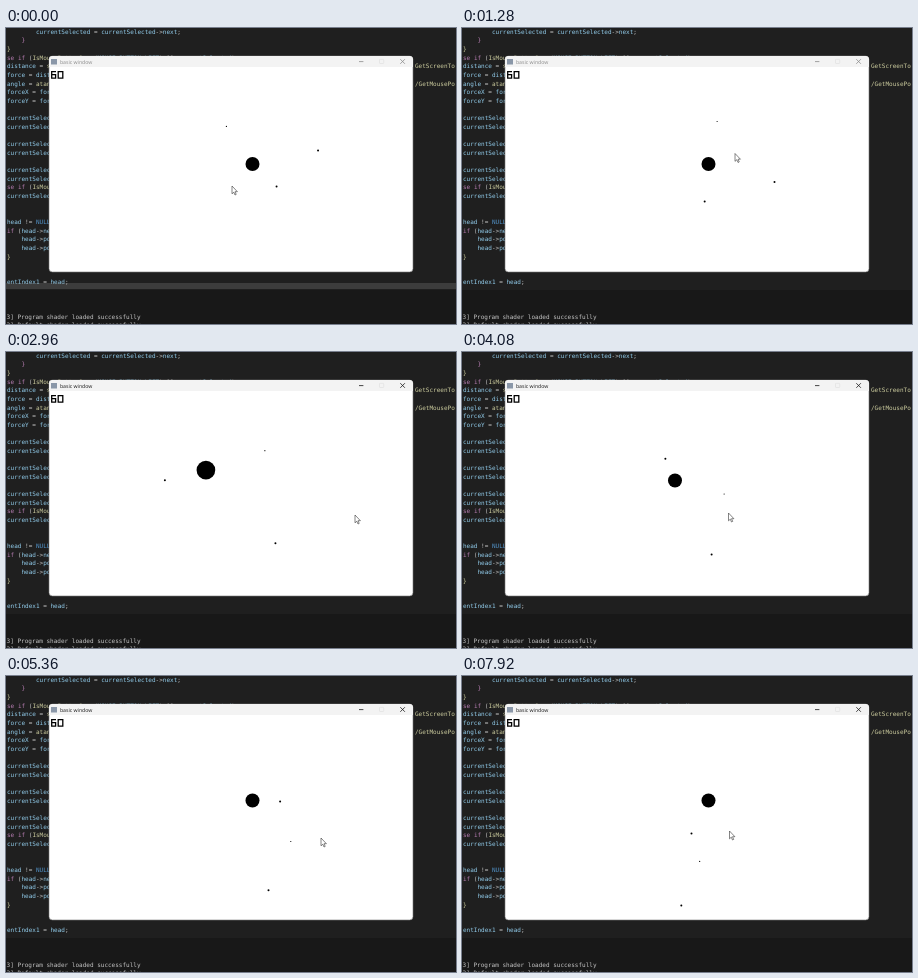
An HTML page for the animation above (8000 ms loop, 450 px wide and 296 px high).

```html
<!DOCTYPE html>
<html lang="en">
<head>
<meta charset="utf-8">
<title>basic window</title>
<style>
  html, body { margin: 0; width: 100%; height: 100%; overflow: hidden; background: #1f1f1f; }
  svg { display: block; width: 450px; height: 296px; }
  text { white-space: pre; text-rendering: geometricPrecision; }
  .mono { font: 6.03px "DejaVu Sans Mono", "Liberation Mono", monospace; fill: #d4d4d4; opacity: .92; }
  .flow { fill: #c586c0; }
  .const { fill: #569cd6; }
  .call { fill: #dcdcaa; }
  .name { fill: #9cdcfe; }
  #title { font: 5.2px "Open Sans", "Noto Sans", sans-serif; }
</style>
</head>
<body>
<svg viewBox="0 0 450 296">
  <rect width="450" height="296" fill="#1f1f1f"/>
  <g id="code" class="mono"></g>
  <rect id="scroll" y="255" width="450" height="6" fill="#797979"/>
  <rect y="262" width="450" height="34" fill="#181818"/>
  <g class="mono">
    <text x=".6" y="291">3] Program shader loaded successfully</text>
    <text x=".6" y="299">3] Default shader loaded successfully</text>
  </g>
  <rect x="43" y="28" width="364" height="216" rx="3.5" fill="#fff" stroke="#777" stroke-width=".6"/>
  <path d="M43 39V31.5a3.5 3.5 0 0 1 3.5-3.5h357a3.5 3.5 0 0 1 3.5 3.5V39z" fill="#f3f3f3"/>
  <rect x="45" y="31" width="6" height="5.5" fill="#8a97a8"/>
  <g id="chrome">
    <text id="title" x="53.9" y="35.8" fill="currentColor">basic window</text>
    <path d="M353 33.6h4.4M394.3 31.2l4.6 4.6m0-4.6l-4.6 4.6" stroke="currentColor" stroke-width=".8" fill="none"/>
  </g>
  <rect x="373.5" y="31.3" width="4.2" height="4.2" rx=".6" fill="none" stroke="#ddd" stroke-width=".6"/>
  <path d="M50 43.7H45.7V50.2H49.6V46.7H45.7M52.2 43.7h4.6v6.5h-4.6z" fill="none" stroke="#000" stroke-width="1.3"/>
  <circle id="sun"/>
  <g id="planets"></g>
  <path id="cursor" d="M0 0V7.8L1.8 6.2L3 9L4.2 8.4L3 5.7H5.4z" fill="#fff" stroke="#333" stroke-width=".6" stroke-linejoin="round"/>
</svg>
<script>
const $ = id => document.getElementById(id);
const LOOP = 8000, STEP = 80, RAD = Math.PI / 180;

function add(parent, tag, attrs, text = '') {
  const el = document.createElementNS('http://www.w3.org/2000/svg', tag);
  for (const k in attrs) el.setAttribute(k, attrs[k]);
  el.textContent = text;
  parent.append(el);
  return el;
}

const code = `        currentSelected = currentSelected->next;
    }
}
se if (IsMouseButtonDown(MOUSE_BUTTON_LEFT) && currentSelected)
distance = sqrt(
force = distance;
angle = atan2(
forceX = force;
forceY = force;

currentSelected->
currentSelected->

currentSelected->
currentSelected->

currentSelected->
currentSelected->
se if (IsMouseButtonDown(
currentSelected->


head != NULL)
if (head->next)
    head->position
    head->position
}


entIndex1 = head;`;

function kind(word, next) {
  if (/^(se|if)$/.test(word)) return 'flow';
  if (word === 'NULL') return 'const';
  if (word.includes('}')) return word[0] === ' ' ? 'flow' : 'call';
  if (!/\w/.test(word)) return '';
  return next === '(' ? 'call' : 'name';
}

const rowY = row => 5.6 + row * 8.65;

code.split('\n').forEach((str, row) => {
  const line = add($('code'), 'text', { x: 1, y: rowY(row) });
  for (const m of str.matchAll(/\w+|\W+/g))
    add(line, 'tspan', { class: kind(m[0], str[m.index + m[0].length]) }, m[0]);
});
add($('code'), 'text', { x: 409, y: rowY(4), class: 'call' }, 'GetScreenTo');
add($('code'), 'text', { x: 409, y: rowY(6), class: 'call' }, '/GetMousePo');

// Pointer stops: ms, x, y
const stops = [
  [0, 226, 158], [1320, 274.5, 124.5], [1720, 242, 98.5], [2560, 256, 86],
  [2960, 349, 163], [3920, 252, 160], [4080, 266.5, 161], [4680, 306, 86],
  [4960, 339.5, 82], [5360, 315, 162], [6640, 298.5, 178], [7920, 267.5, 155]
];

function pointer(t) {
  const i = stops.findIndex(s => s[0] > t);
  if (i < 0) return stops[stops.length - 1].slice(1);
  const [t0, x0, y0] = stops[i - 1], [t1, x1, y1] = stops[i];
  const k = (t - t0) / (t1 - t0);
  return [x0 + (x1 - x0) * k, y0 + (y1 - y0) * k];
}

// The pointer drags the view, and the wheel zooms about the pointer
function camera(t) {
  const view = { x: 246.5, y: 136, zoom: 1 };
  const drag = (from, to) => {
    if (t < from) return;
    const [x0, y0] = pointer(from), [x1, y1] = pointer(Math.min(t, to));
    view.x += x1 - x0;
    view.y += y1 - y0;
  };
  const wheel = (at, zoom) => {
    if (t < at) return;
    const [x, y] = pointer(at), k = zoom / view.zoom;
    view.x = x + (view.x - x) * k;
    view.y = y + (view.y - y) * k;
    view.zoom = zoom;
  };
  drag(1320, 1720);
  wheel(2560, 1.335);
  wheel(3920, 1);
  drag(4680, 4960);
  return view;
}

// Kepler orbits: a semi-major axis, e eccentricity, w periapsis, m phase (degrees)
const PULL = 9906;
const planets = [
  { a: 30.33, e: .241, w: -80, m: 97.5, r: 1 },
  { a: 108.6, e: .384, w: -7.8, m: -1.6, r: 1 },
  { a: 52.48, e: .1735, w: -75, m: -35.8, r: .6 }
];
for (const o of planets) o.el = add($('planets'), 'circle');

function orbit({ a, e, w, m }, sec) {
  const mean = (m + PULL / a ** 1.5 * sec) * RAD;
  let E = mean;
  for (let i = 0; i < 8; i++) E -= (E - e * Math.sin(E) - mean) / (1 - e * Math.cos(E));
  const u = a * (Math.cos(E) - e), v = a * Math.sqrt(1 - e * e) * Math.sin(E);
  const c = Math.cos(w * RAD), s = Math.sin(w * RAD);
  return [u * c - v * s, u * s + v * c];
}

function place(el, cx, cy, r) {
  el.setAttribute('cx', cx);
  el.setAttribute('cy', cy);
  el.setAttribute('r', r);
}

function draw(t) {
  const { x, y, zoom } = camera(t);
  place($('sun'), x, y, 7 * zoom);
  for (const o of planets) {
    const [dx, dy] = orbit(o, t / 1000);
    place(o.el, x + dx * zoom, y + dy * zoom, o.r);
  }
  $('cursor').setAttribute('transform', `translate(${pointer(t)})`);
  $('chrome').style.color = t < 1360 ? '#8c8c8c' : '#1a1a1a';
  $('scroll').style.opacity = .32 * Math.max(0, 1 - t / 800);
}

function tick() {
  const t = performance.now() % LOOP;
  draw(Math.floor(t / STEP) * STEP);
  requestAnimationFrame(tick);
}
tick();
</script>
</body>
</html>
```
